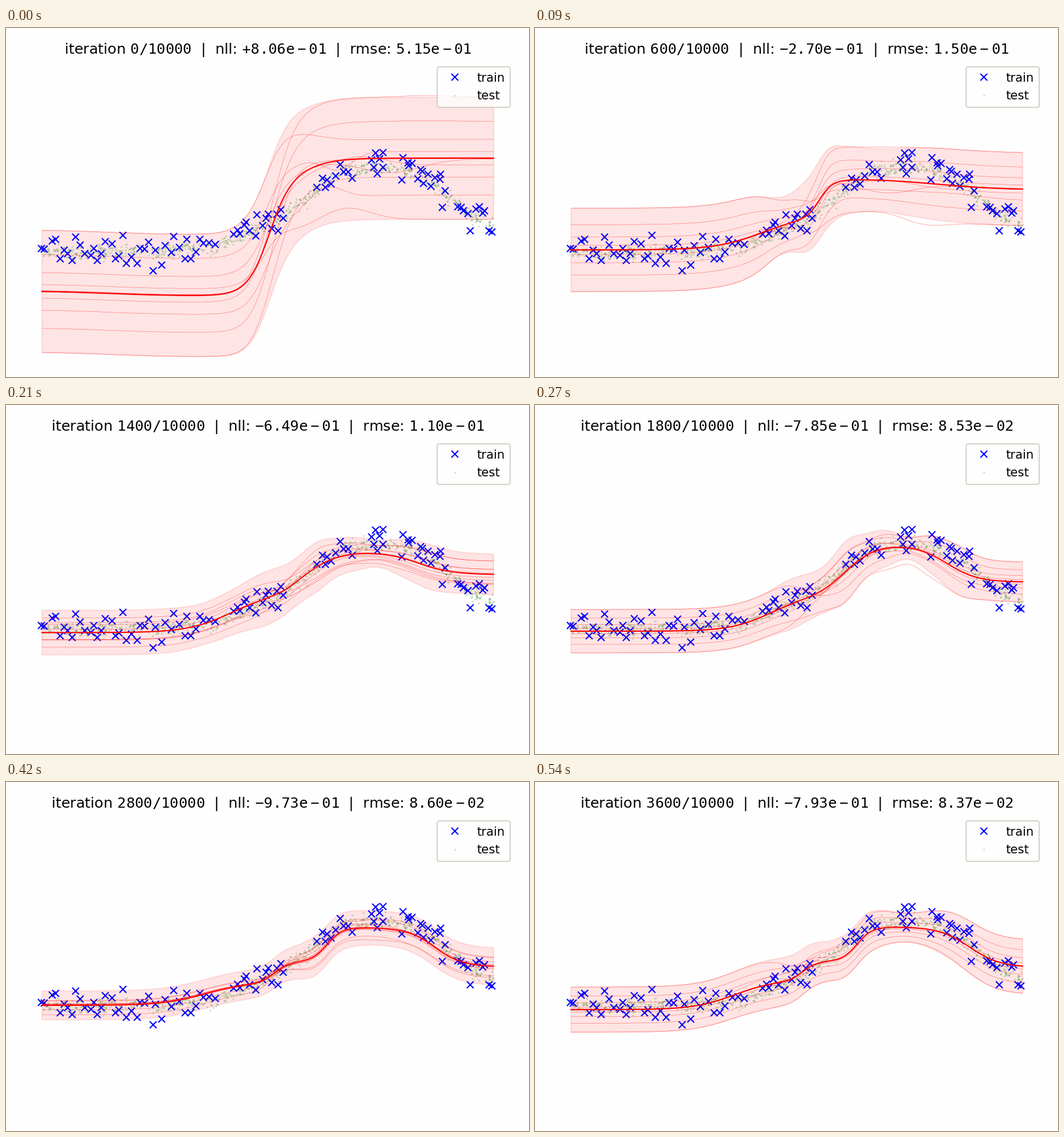
Recreate the animation shown at these times as a matplotlib script. Size 917 px wide and 611 px high, loop 1570 ms.

```python
import numpy as np
import matplotlib.pyplot as plt
from matplotlib.animation import FuncAnimation
from matplotlib.collections import LineCollection

W, H, DPI = 917, 611, 128
TICK, STEP, LOOP = 10, 30, 1570      # ms
LAST = 18                            # steps before the final hold
N = 10                               # sampled functions
S = 152.8 / DPI                      # point scale of the 6 x 4 inch layout
X = np.linspace(63, 855, 260)
rng = np.random.default_rng(7)
plt.rcParams.update({"font.family": "DejaVu Sans",
                     "mathtext.fontset": "dejavusans",
                     "patch.linewidth": S})


def step(x, c, w):
    return 1 / (1 + np.exp(-(x - c) / w))


def steps(x, base, *parts):
    """Start level plus smooth steps (rise, centre, width), in pixels."""
    return base + sum(a * step(x, c, w) for a, c, w in parts)


def spread(x, left, right, *bumps):
    """Half height of the band: two levels plus bumps (rise, centre, width)."""
    return left + (right - left) * step(x, 525, 8) + sum(
        a * np.exp(-((x - c) / w) ** 2) for a, c, w in bumps)


def wander():
    """Sampled functions: offsets from the mean, in half band heights."""
    s = np.linspace(-1, 1, N)
    level = s * abs(s)               # most stay close to the mean
    a, b = rng.permutation(level)[:, None], rng.permutation(level)[:, None]
    c, w = rng.uniform(420, 740, (N, 1)), rng.uniform(35, 80, (N, 1))
    bump = rng.normal(0, 0.25, (N, 1)) * np.exp(-((X - c) / w) ** 2)
    return a + (b - a) * step(X, 480, 20) + bump


def truth(x):
    return steps(x, 392, (-58, 415, 35), (-93, 537, 28), (116, 780, 33))


# iteration: (nll, rmse, mean, half height of the band)
STATES = {
    0: (0.806, 0.515,
        steps(X, 460, (9, 180, 60), (-205, 461, 19), (-36, 520, 30)),
        spread(X, 107, 107, (11, 460, 60))),
    600: (-0.270, 0.150,
          steps(X, 388.5, (-62, 400, 42), (-64, 499, 11), (21, 700, 60)),
          spread(X, 73, 64, (-23, 437, 42), (-9, 600, 70))),
    1000: (-0.512, 0.142,
           steps(X, 401, (-76, 380, 38), (-57, 508, 17), (17, 730, 55)),
           spread(X, 40, 36.5, (-5, 340, 40), (11, 462, 45), (-11, 625, 70))),
    1800: (-0.785, 0.0853,
           steps(X, 396, (-60, 410, 35), (-92, 545, 26), (66, 722, 27)),
           spread(X, 38, 35, (6, 450, 35), (18, 545, 28),
                  (-15, 655, 32), (8, 742, 35))),
    2400: (-1.00, 0.0775,
           steps(X, 391, (-43, 364, 38), (-37, 478, 13),
                 (-61, 562, 14), (73, 754, 30)),
           spread(X, 27, 29, (7, 520, 45), (2, 740, 40))),
    3200: (-0.946, 0.0954,
           steps(X, 391, (-38, 335, 36), (-35, 464, 11),
                 (-59, 564, 13), (66, 750, 20)),
           spread(X, 23.5, 36.5, (-6, 655, 60))),
    3600: (-0.793, 0.0837,
           steps(X, 398.5, (-52, 350, 36), (-33, 470, 12),
                 (-60, 565, 13), (71, 762, 27)),
           spread(X, 39.5, 47.5, (3, 410, 60), (-8, 540, 45), (-22, 650, 70))),
}
ITERS = list(STATES)
NLL, RMSE, MEAN, HALF = zip(*STATES.values())
OFFSET = [wander() for _ in ITERS]


def blend(it, rows):
    """Mix the two states on either side of an iteration."""
    k = min(np.searchsorted(ITERS, it, side="right") - 1, len(ITERS) - 2)
    t = (it - ITERS[k]) / (ITERS[k + 1] - ITERS[k])
    return (1 - t) * rows[k] + t * rows[k + 1]


# Training points come in groups (from, to, count) with gaps between them
GROUPS = [(63, 363, 41), (400, 489, 16), (545, 606, 10),
          (642, 660, 7), (694, 772, 16), (792, 852, 11)]
train_x = np.concatenate([np.linspace(a, b, n) + rng.normal(0, 2, n)
                          for a, b, n in GROUPS])
train_y = truth(train_x) + rng.normal(0, 15, train_x.size).clip(-34, 34)
test_x = rng.uniform(63, 855, 800)
test_y = truth(test_x) + rng.normal(0, 6.2, test_x.size)

fig = plt.figure(figsize=(W / DPI, H / DPI), dpi=DPI, facecolor="#fefefe")
ax = fig.add_axes([0, 0, 1, 1])
ax.set(xlim=(0, W), ylim=(H, 0))
ax.axis("off")

band, = ax.fill(X, X, fc="red", ec="red", alpha=0.1, lw=S, zorder=1)
test, = ax.plot(test_x, test_y, "o", color="green", ms=1.6 * S, mew=0,
                alpha=0.2, zorder=2, label="test")
train, = ax.plot(train_x, train_y, "x", color="blue", ms=6 * S, mew=S,
                 zorder=2.2, label="train")
samples = LineCollection([], colors="red", linewidths=0.25 * S, alpha=0.6,
                         zorder=2.5)
ax.add_collection(samples)
line, = ax.plot([], [], color="red", lw=S, zorder=3)
legend = ax.legend(handles=[train, test], loc="upper right", fontsize=10 * S,
                   borderpad=0.45, labelspacing=0.55, edgecolor="#cdc8bb",
                   bbox_to_anchor=(894.4, 57.4), bbox_transform=ax.transData)
title = ax.text(W / 2 + 0.5, 44.7, "", fontsize=12 * S, ha="center",
                va="baseline")


def update(f):
    it = 200 * min(f * TICK // STEP, LAST)
    mean, half = blend(it, MEAN), blend(it, HALF)
    band.set_xy(np.column_stack([np.r_[X, X[::-1]],
                                 np.r_[mean - half, (mean + half)[::-1]]]))
    line.set_data(X, mean)
    samples.set_segments([np.column_stack([X, mean + half * z])
                          for z in blend(it, OFFSET)])
    nll = np.interp(it, ITERS, NLL)
    rmse = np.exp(np.interp(it, ITERS, np.log(RMSE)))
    title.set_text(rf"iteration $\mathtt{{{it}/10000}}$  |  "
                   rf"nll: $\mathtt{{{nll:+.2e}}}$  |  "
                   rf"rmse: $\mathtt{{{rmse:.2e}}}$")
    return band, samples, line, title


anim = FuncAnimation(fig, update, frames=LOOP // TICK, interval=TICK,
                     repeat=True, repeat_delay=0)
plt.show()
```
